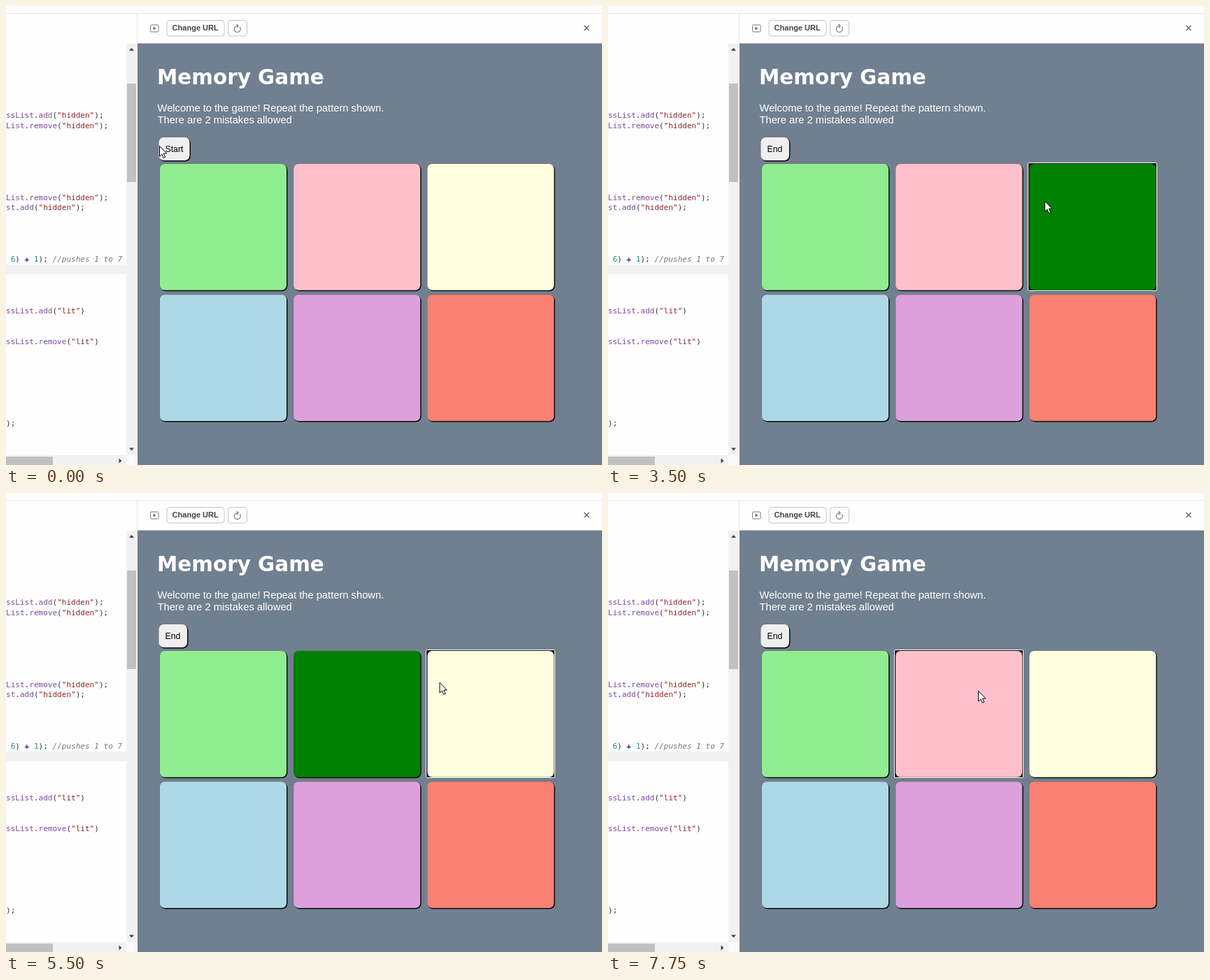
An HTML page that plays this animation: 852 px wide and 657 px high, repeating every 8 s.

```html
<!DOCTYPE html>
<html lang="en">
<head>
<meta charset="utf-8">
<title>Memory Game</title>
<style>
html, body { margin: 0; width: 100%; height: 100%; overflow: hidden; background: #fefefe; }
svg { display: block; width: 852px; height: 657px; }
text { white-space: pre; }
.ui { font-family: "Liberation Sans", Arial, sans-serif; }
.code { font: 11.04px "DejaVu Sans Mono", monospace; fill: #333; }
.prop { fill: #7c4a9c; }
.str { fill: #8c2626; }
.num { fill: #2a8585; }
.op { fill: #1a1aa6; font-weight: bold; }
.note { fill: #777; font-style: italic; }
</style>
</head>
<body>
<svg id="stage" viewBox="0 0 852 657" xmlns="http://www.w3.org/2000/svg">
  <rect width="852" height="657" fill="#fefefe"/>
  <path d="M0 10.5H852M187.5 11V54" stroke="#e6e6e6" fill="none"/>
  <g id="code"></g>

  <!-- editor scrollbars -->
  <path d="M172 54h16v589h-16zM0 370h172v14H0zM0 643h172v14H0z" fill="#f1f1f1"/>
  <path d="M172 643h16v14h-16z" fill="#fafafa"/>
  <path d="M173 111h13v141h-13zM0 645h67v12H0z" fill="#c1c1c1"/>
  <path d="M176 64l3.5-4 3.5 4zM176 632.500l3.500 4 3.500-4zM161.500 647.500l4 3.500-4 3.500z" fill="#444"/>

  <!-- preview toolbar -->
  <g fill="none" stroke="#777">
    <rect x="206.500" y="27" width="11.500" height="10" rx="1.500"/>
    <path d="M210.500 29.500v5l4-2.500z" fill="#666" stroke="none"/>
    <rect x="230" y="20.500" width="82" height="22.500" rx="4" stroke="#c4c4c4"/>
    <rect x="317.500" y="20.500" width="27" height="22.500" rx="4" stroke="#c4c4c4"/>
    <path d="M334.300 30.200a4.500 4.500 0 1 1-3.300-1.700M329.500 26l2.800 2.500-2.800 2.500" stroke-width="1.100"/>
    <path d="M826.500 28l7 7M833.500 28l-7 7" stroke="#666" stroke-width="1.500"/>
  </g>
  <text class="ui" x="237.600" y="35.300" font-size="11.040" font-weight="bold" fill="#444">Change URL</text>

  <!-- game page -->
  <rect x="188" y="53.500" width="664" height="604" fill="#708090"/>
  <g fill="#fff">
    <text x="216" y="112" font-size="29.440" font-weight="bold" font-family="'DejaVu Sans', Verdana, sans-serif">Memory Game</text>
    <g class="ui" font-size="14.720">
      <text x="216.500" y="151">Welcome to the game! Repeat the pattern shown.</text>
      <text x="216.500" y="168">There are 2 mistakes allowed</text>
    </g>
  </g>
  <g id="button"></g>
  <text id="label" class="ui" x="227.500" y="208.500" font-size="12.270" fill="#000"></text>
  <g id="tiles"></g>
  <path id="cursor" d="M.500.500V15.200L3.800 12 6.200 17.400 8.700 16.300 6.300 11.100H10.900Z" fill="#fff" stroke="#000" stroke-linejoin="round"/>
</svg>
<script>
const NS = 'http://www.w3.org/2000/svg';
const $ = id => document.getElementById(id);

function add(parent, tag, attrs, text) {
  const el = document.createElementNS(NS, tag);
  for (const k in attrs) el.setAttribute(k, attrs[k]);
  if (text !== undefined) el.textContent = text;
  return parent.appendChild(el);
}

const box = (parent, x, y, width, height, rx, fill) =>
  add(parent, 'rect', { x, y, width, height, rx, fill });

// Outset border: grey at top left, black at bottom right
function raised(parent, x, y, w, h, fill) {
  const edge = box(parent, x - 1, y - 1, w, h, 8, '#767676');
  const shade = box(parent, x + .5, y + .5, w + 1, h + 1, 8, '#0c0c0c');
  const face = box(parent, x, y, w, h, 7, fill);
  return { edge, shade, face };
}

// Code lines: baseline, then [style, text] runs
const call = (obj, method, arg, end) => [
  ['prop', obj], ['', '.'], ['prop', method], ['', '('], ['str', `"${arg}"`], ['', end]
];
const lines = [
  [160, call('ssList', 'add', 'hidden', ');')],
  [174.7, call('List', 'remove', 'hidden', ');')],
  [277.7, call('List', 'remove', 'hidden', ');')],
  [292.4, call('st', 'add', 'hidden', ');')],
  [366, [['num', ' 6'], ['', ') '], ['op', '+'], ['num', ' 1'], ['', '); '], ['note', '//pushes 1 to 7']]],
  [439.5, call('ssList', 'add', 'lit', ')')],
  [483.5, call('ssList', 'remove', 'lit', ')')],
  [601, [['', ');']]]
];
for (const [y, runs] of lines) {
  const line = add($('code'), 'text', { class: 'code', x: 0, y });
  for (const [style, text] of runs) add(line, 'tspan', { class: style }, text);
}

const button = raised($('button'), 218.5, 188, 44, 33, '#efefef');

const colors = ['#90ee90', '#ffc0cb', '#ffffe0', '#add8e6', '#dda0dd', '#fa8072'];
const tiles = colors.map((color, i) => {
  const x = 220 + 191.2 * (i % 3), y = 226 + 187.3 * Math.floor(i / 3);
  const tile = raised($('tiles'), x, y, 181, 180.8, color);
  const ring = add($('tiles'), 'rect', {
    x: Math.round(x) - 1.5, y: Math.round(y) - 1.5, width: 184, height: 183,
    rx: 1.5, fill: '#101010', stroke: '#fff'
  });
  $('tiles').insertBefore(ring, tile.face);
  return { ...tile, ring, color };
});

// Each track holds [time, value] steps; the latest one applies
const PINK = 1, YELLOW = 2, NONE = -1;
const label = [[0, 'Start'], [750, 'End']];
const lit = [
  [0, NONE], [1750, YELLOW], [2500, NONE], [3500, YELLOW], [3750, NONE],
  [4750, YELLOW], [5250, NONE], [5500, PINK], [6000, NONE],
  [6750, YELLOW], [7000, NONE], [7500, PINK], [7750, NONE]
];
const focus = [[0, NONE], [3500, YELLOW], [7500, PINK]];
const pointer = [
  [0, [219, 200]], [500, [231, 201]], [750, [235, 201]], [2500, [236, 202]],
  [2750, [491, 228]], [3000, [634, 286]], [3500, [624, 279]],
  [4000, [622, 272]], [4250, [619.5, 271]], [7250, [529, 283]]
];
const at = (track, t) => track.filter(step => step[0] <= t).pop()[1];

function draw(t) {
  const text = at(label, t), w = text === 'Start' ? 44 : 40.5;
  $('label').textContent = text;
  button.edge.setAttribute('width', w);
  button.shade.setAttribute('width', w + 1);
  button.face.setAttribute('width', w);

  const on = at(lit, t), focused = at(focus, t);
  tiles.forEach((tile, i) => {
    tile.face.setAttribute('fill', i === on ? '#008000' : tile.color);
    tile.ring.setAttribute('visibility', i === focused ? 'visible' : 'hidden');
  });
  $('cursor').setAttribute('transform', `translate(${at(pointer, t)})`);
}

const start = performance.now();
function tick() {
  draw((performance.now() - start) % 8000);
  requestAnimationFrame(tick);
}
tick();
</script>
</body>
</html>
```
